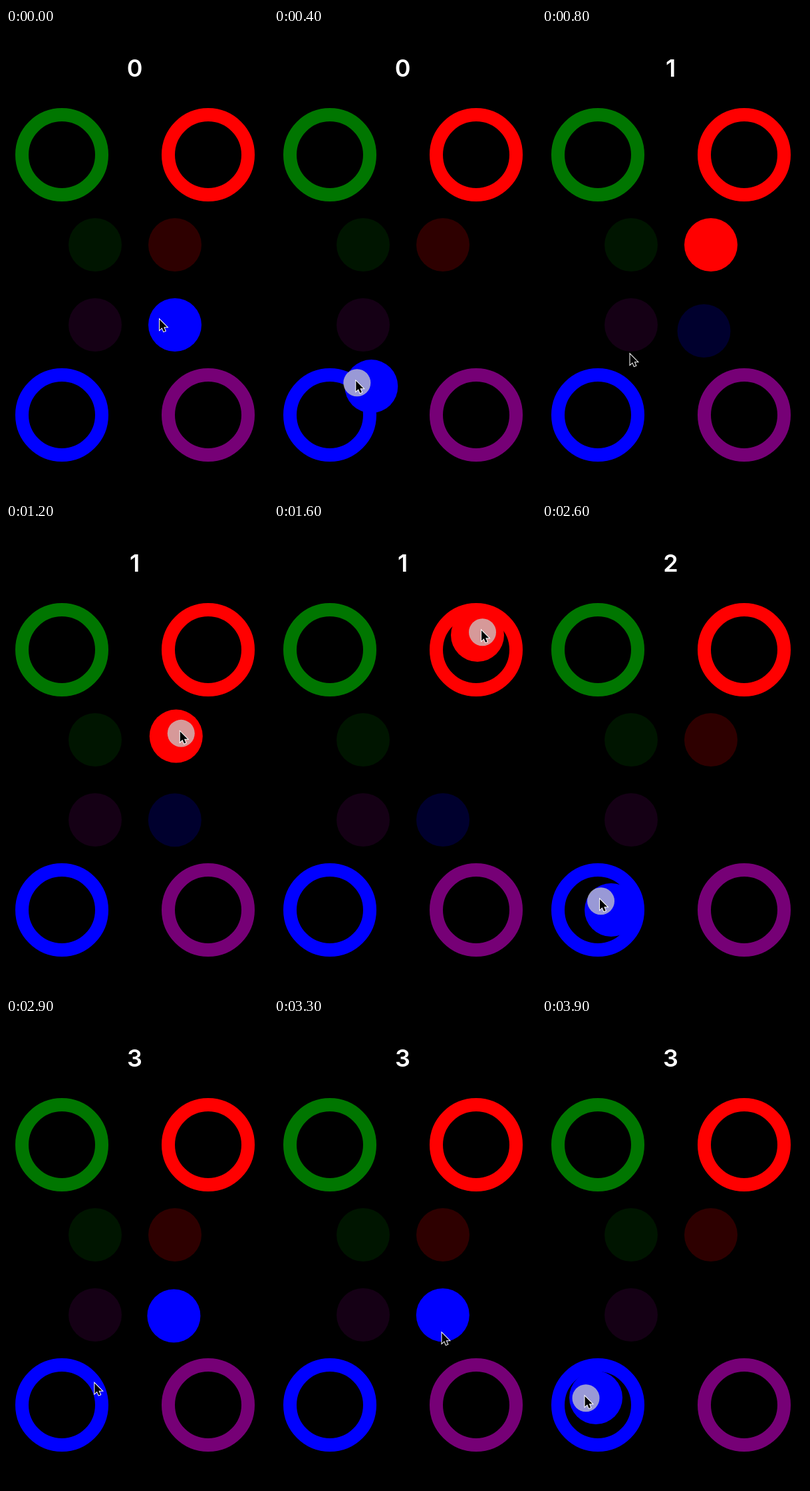
These frames come from a looping animation (394 by 700 pixels, 4000 ms). An HTML page with a canvas:

```html
<!DOCTYPE html>
<html lang="en">
<head>
<meta charset="utf-8">
<title>Colour match</title>
<style>
  html, body { margin: 0; height: 100%; overflow: hidden; background: #000; }
  canvas { display: block; }
</style>
</head>
<body>
<canvas id="stage" width="394" height="700"></canvas>
<script>
const ctx = document.getElementById('stage').getContext('2d');
const LOOP = 4000, STEP = 100;

const items = [
  { color: '#007600', ring: [84, 190], home: [134, 325] },
  { color: '#ff0000', ring: [304, 190], home: [254, 325] },
  { color: '#760076', ring: [304, 580], home: [134, 445] },
  { color: '#0000ff', ring: [84, 580], home: [254, 445] }
];

// Each drag moves one ball between press and release.
const drags = [
  { item: 3, press: 130, release: 610 },
  { item: 1, press: 1150, release: 1680 },
  { item: 3, press: 2290, release: 2680 },
  { item: 3, press: 3450, release: Infinity }
];

// Pointer path: time, x, y
const path = [
  [0, 231, 437], [130, 231, 437], [550, 79, 567], [610, 79, 567],
  [800, 132.5, 489], [1090, 260, 318], [1150, 260, 318],
  [1600, 312, 161], [1680, 312, 161], [2200, 245.5, 418],
  [2270, 237, 429], [2290, 237, 429], [2600, 87, 564], [2680, 85, 565],
  [3300, 252.5, 472], [3420, 237.5, 443], [3450, 237.5, 443],
  [3900, 64.5, 567], [4000, 64.5, 567]
];

// Monotone cubic interpolation along one axis of the path.
function along(t, axis) {
  const slope = i => path[i] && path[i + 1]
    ? (path[i + 1][axis] - path[i][axis]) / (path[i + 1][0] - path[i][0]) : 0;
  const tangent = i => {
    const a = slope(i - 1), b = slope(i);
    return a * b > 0 ? 2 * a * b / (a + b) : 0;
  };
  let i = 0;
  while (i < path.length - 2 && path[i + 1][0] <= t) i++;
  const p = path[i], q = path[i + 1], span = q[0] - p[0];
  const u = (t - p[0]) / span, s = u * u * (3 - 2 * u);
  return p[axis] + (q[axis] - p[axis]) * s
    + span * u * (1 - u) * ((1 - u) * tangent(i) - u * tangent(i + 1));
}
const pointerAt = t => [along(t, 1), along(t, 2)];

// Remaining share of the offset of a lightly damped spring.
function spring(ms) {
  const t = ms / 1000;
  return Math.exp(-11 * t) * (Math.cos(10.45 * t) + 1.05 * Math.sin(10.45 * t));
}

function ballAt(index, t) {
  const { home } = items[index];
  const drag = drags.filter(d => d.item === index && d.press <= t).pop();
  if (!drag) return home;
  const from = pointerAt(drag.press);
  const to = pointerAt(Math.min(t, drag.release));
  const share = t > drag.release ? spring(t - drag.release) : 1;
  return home.map((h, k) => h + (to[k] - from[k]) * share);
}

function circle([x, y], r) {
  ctx.beginPath();
  ctx.arc(x, y, r, 0, 2 * Math.PI);
}

function disc(center, r, color, alpha) {
  ctx.globalAlpha = alpha;
  ctx.fillStyle = color;
  circle(center, r);
  ctx.fill();
  ctx.globalAlpha = 1;
}

const arrow = new Path2D('M0 0V15.5L3.6 12.2L6.1 18L8.7 16.9L6.2 11.2H11.2Z');

function drawPointer([x, y]) {
  ctx.save();
  ctx.translate(x, y);
  ctx.lineWidth = 2;
  ctx.strokeStyle = '#fff';
  ctx.stroke(arrow);
  ctx.fillStyle = '#000';
  ctx.fill(arrow);
  ctx.restore();
}

function draw(t) {
  const score = drags.filter(d => d.release < t).length;
  const active = drags[score].item;

  ctx.fillStyle = '#000';
  ctx.fillRect(0, 0, 394, 700);
  ctx.fillStyle = '#fff';
  ctx.font = '600 36px Inter, sans-serif';
  ctx.textAlign = 'center';
  ctx.fillText(score, 193.5, 73);

  ctx.lineWidth = 20;
  for (const { color, ring } of items) {
    ctx.strokeStyle = color;
    circle(ring, 60);
    ctx.stroke();
  }
  items.forEach(({ color }, i) => disc(ballAt(i, t), 40, color, i === active ? 1 : 0.18));

  const [x, y] = pointerAt(t);
  if (drags.some(d => d.press <= t && t <= d.release)) {
    disc([x + 1.5, y + 2.7], 20.5, '#c9c9c9', 0.76);
  }
  drawPointer([x, y]);
}

function tick() {
  draw(Math.floor(performance.now() % LOOP / STEP) * STEP);
  requestAnimationFrame(tick);
}
tick();
</script>
</body>
</html>
```
